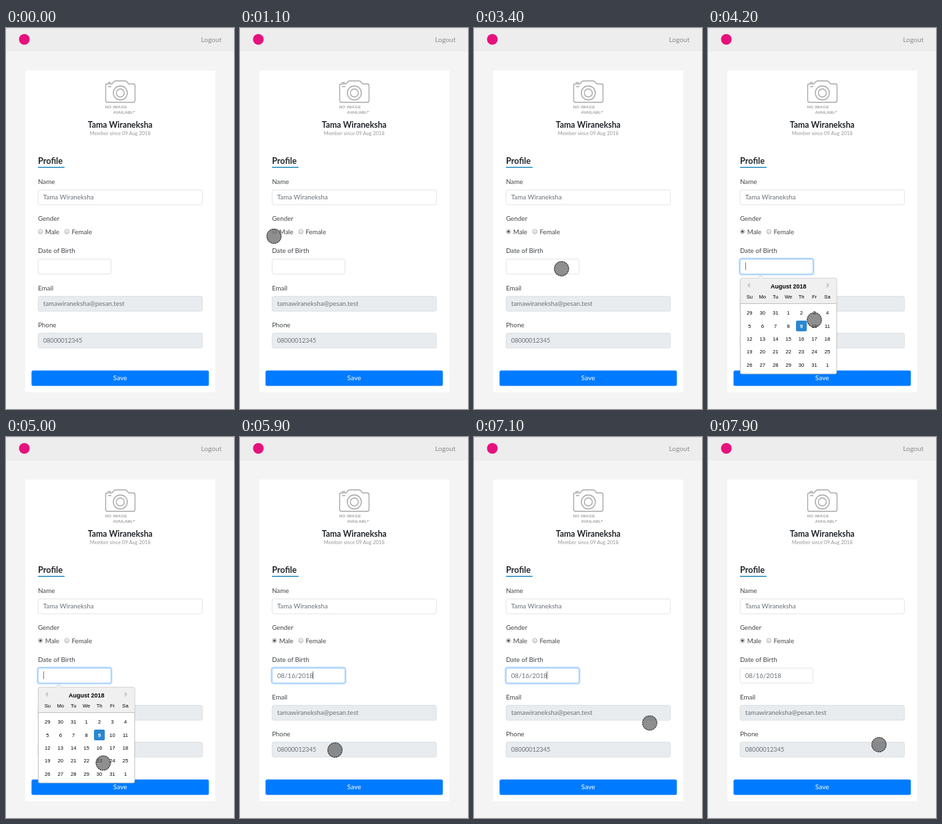
Write an HTML page that moves like this. It is 342 px wide and 569 px high and loops after 8 s.

```html
<!DOCTYPE html>
<html lang="en">
<head>
<meta charset="utf-8">
<title>Profile form</title>
<style>
html, body { margin: 0; width: 100%; height: 100%; overflow: hidden; background: #f4f4f4; }
svg { display: block; width: 342px; height: 569px; }
text { font-family: Lato, sans-serif; font-size: 9.8px; fill: #42464a; }
.field { fill: #fff; stroke: #d9dde1; stroke-width: .8; }
.off { fill: #e9ecef; stroke: #d3d8dc; }
.value { fill: #6a7178; }
.bold { font-weight: 700; fill: #212529; }
.mid { text-anchor: middle; }
.radio { fill: url(#knob); stroke: #a9a9a9; stroke-width: .7; }
.icon { fill: none; stroke: #a8a8a8; stroke-width: 1.4; stroke-linejoin: round; }
.icon text, .cal text { font-family: "Liberation Sans", Arial, sans-serif; }
.icon text { font-size: 6.1px; font-weight: 700; fill: #a3a3a3; stroke: none; }
.cal text { font-size: 7.6px; fill: #000; text-anchor: middle; }
.cal .month { font-size: 9px; font-weight: 700; }
.cal .today { fill: #fff; font-weight: 700; }
</style>
</head>
<body>
<svg viewBox="0 0 342 569">
  <defs>
    <linearGradient id="knob" x2="0" y2="1">
      <stop stop-color="#f4f4f4"/><stop offset="1" stop-color="#d6d6d6"/>
    </linearGradient>
    <clipPath id="round"><circle cx="171.5" cy="102" r="31.7"/></clipPath>
  </defs>

  <rect width="342" height="569" fill="#f4f4f4"/>
  <rect width="342" height="35" fill="#ededed"/>
  <rect width="342" height="1" fill="#e0e0e0"/>
  <circle cx="27.5" cy="17" r="8" fill="#e5127d"/>
  <text x="292.5" y="21" style="font-size:10.2px;fill:#8c8c8c">Logout</text>

  <rect x="28.8" y="63.5" width="285" height="480.5" fill="#fff"/>
  <g class="icon" clip-path="url(#round)">
    <path d="M152 83.5H159L162 80Q163 79 165 79H178Q180 79 181 80L184 83.5H191Q193.500 83.500 193.500 86V108Q193.500 111 191 111H152Q149.500 111 149.500 108V86Q149.500 83.500 152 83.500Z"/>
    <circle cx="171.500" cy="97" r="10.500"/>
    <circle cx="171.500" cy="97" r="6"/>
    <path d="M152.500 81.500H157.500M153 87.500H158"/>
    <text x="148.700" y="120" letter-spacing=".25">NO IMAGE</text>
    <text x="160.500" y="128">AVAILABLE</text>
  </g>
  <text class="bold mid" x="171.300" y="149" style="font-size:12.300px">Tama Wiraneksha</text>
  <text class="mid" x="171.300" y="160" style="font-size:7.500px;fill:#979797">Member since 09 Aug 2018</text>

  <text class="bold" x="48" y="203" style="font-size:12.700px">Profile</text>
  <rect x="48" y="207.400" width="39.800" height="1.600" fill="#2b8fc1"/>

  <g id="form"></g>
  <circle class="radio" cx="51.700" cy="304" r="3.400"/>
  <circle class="radio" cx="91.300" cy="304" r="3.400"/>
  <circle id="dot" cx="51.700" cy="304" r="1.800" fill="#484848"/>
  <text x="58.700" y="308">Male</text>
  <text x="98.400" y="308">Female</text>

  <rect id="focus" x="47.100" y="344.100" width="111.400" height="24.400" rx="3.500" fill="#fff" stroke="#bfdeff" stroke-width="2.200"/>
  <rect id="edge" class="field" x="48.200" y="345.200" width="109.300" height="22.200" rx="2.500"/>
  <text id="date" class="value" x="55.700" y="359.500">08/16/2018</text>
  <rect id="caret" y="350" width=".8" height="11.500" fill="#555"/>

  <rect x="38.300" y="511.600" width="266" height="22.800" rx="2.500" fill="#007bff"/>
  <text class="mid" x="171.300" y="526.300" style="font-size:10.200px;fill:#fff">Save</text>

  <g id="cal" class="cal">
    <rect x="48.400" y="373.900" width="144.600" height="142.800" rx="2.500" fill="#fff" stroke="#aeaeae" stroke-width=".8"/>
    <path d="M48.800 411.600V376.500Q48.800 374.300 51 374.300H190.400Q192.600 374.300 192.600 376.500V411.600Z" fill="#f0f0f0"/>
    <path d="M48.400 411.600H193" stroke="#aeaeae" stroke-width=".8"/>
    <path d="M74 374.400L79 368.800L84 374.400" fill="#f0f0f0" stroke="#c4c4c4" stroke-width=".7"/>
    <path d="M63 380V388.600L58.700 384.300ZM178 380V388.600L182.300 384.300Z" fill="#ccc"/>
    <text class="month" x="120.700" y="388.700">August 2018</text>
    <rect x="132" y="436.900" width="16.200" height="16.200" rx="2" fill="#2a87d0"/>
  </g>

  <g id="touch">
    <circle r="11.400" fill="#555" fill-opacity=".66"/>
    <circle r="10.600" fill="none" stroke="#2a2a2a" stroke-width="1.100" stroke-dasharray="1.700 1.630"/>
  </g>
</svg>
<script>
const LOOP = 8000, STEP = 100;
const CHECK = 2100, OPEN = 3800, PICK = 5800, BLUR = 7400;
const $ = id => document.getElementById(id);

function add(parent, tag, attrs, text) {
  const el = document.createElementNS('http://www.w3.org/2000/svg', tag);
  for (const key in attrs) el.setAttribute(key, attrs[key]);
  if (text !== undefined) el.textContent = text;
  parent.appendChild(el);
}

function show(id, on) {
  $(id).style.display = on ? '' : 'none';
}

function addRow(label, y, value, kind = 'field', size = 9.8) {
  add($('form'), 'text', { x: 48, y }, label);
  if (!value) return;
  add($('form'), 'rect', { class: kind, x: 48.2, y: y + 8.8, width: 246.4, height: 22.2, rx: 2.5 });
  add($('form'), 'text', { class: 'value', x: 55.7, y: y + 23, style: `font-size:${size}px` }, value);
}

addRow('Name', 233, 'Tama Wiraneksha');
addRow('Gender', 288);
addRow('Date of Birth', 336);
addRow('Email', 392, 'tamawiraneksha@pesan.test', 'field off');
addRow('Phone', 447, '08000012345', 'field off', 9.2);

const colX = i => 62.3 + 19.45 * i;
['Su', 'Mo', 'Tu', 'We', 'Th', 'Fr', 'Sa'].forEach((name, i) =>
  add($('cal'), 'text', { x: colX(i), y: 404.3 }, name));
for (let i = 0; i < 35; i++) {
  const day = (i + 28) % 31 + 1;
  add($('cal'), 'text', {
    class: i === 11 ? 'today' : '',
    x: colX(i % 7), y: 428.3 + 19.35 * Math.floor(i / 7)
  }, day);
}

// pointer moves: start, end, x, y; it rests in between
const enter = [265, 320];
const moves = [
  [500, 800, 51, 311],
  [1300, 1700, 49.5, 302.5],
  [2200, 2600, 125, 361],
  [2800, 3400, 131.3, 359.5],
  [3800, 4200, 159.5, 436],
  [4200, 4900, 146, 488],
  [4900, 5600, 142.5, 467.5],
  [5900, 6600, 277, 440],
  [6600, 7200, 262.5, 426],
  [7400, 7900, 256.5, 459.5]
];
const ease = k => k * k * (3 - 2 * k);

function pointAt(t) {
  let [x, y] = enter;
  for (const [from, to, x1, y1] of moves) {
    if (t <= from) break;
    const k = ease(Math.min(1, (t - from) / (to - from)));
    x += (x1 - x) * k;
    y += (y1 - y) * k;
  }
  return [x, y];
}

function draw(now) {
  const t = Math.floor(now % LOOP / STEP) * STEP;
  const focused = t >= OPEN && t < BLUR;
  const picked = t >= PICK;
  const blink = (t - (picked ? PICK : OPEN)) % 1000 < 500;

  show('dot', t >= CHECK);
  show('focus', focused);
  $('edge').style.stroke = focused ? '#80bdff' : '';
  show('date', picked);
  show('cal', focused && !picked);
  show('caret', focused && blink);
  $('caret').setAttribute('x', picked ? 109.2 : 56);

  show('touch', t >= moves[0][0]);
  $('touch').setAttribute('transform', `translate(${pointAt(t)})`);
}

const start = performance.now();
function tick() {
  draw(performance.now() - start);
  requestAnimationFrame(tick);
}
tick();
</script>
</body>
</html>
```
